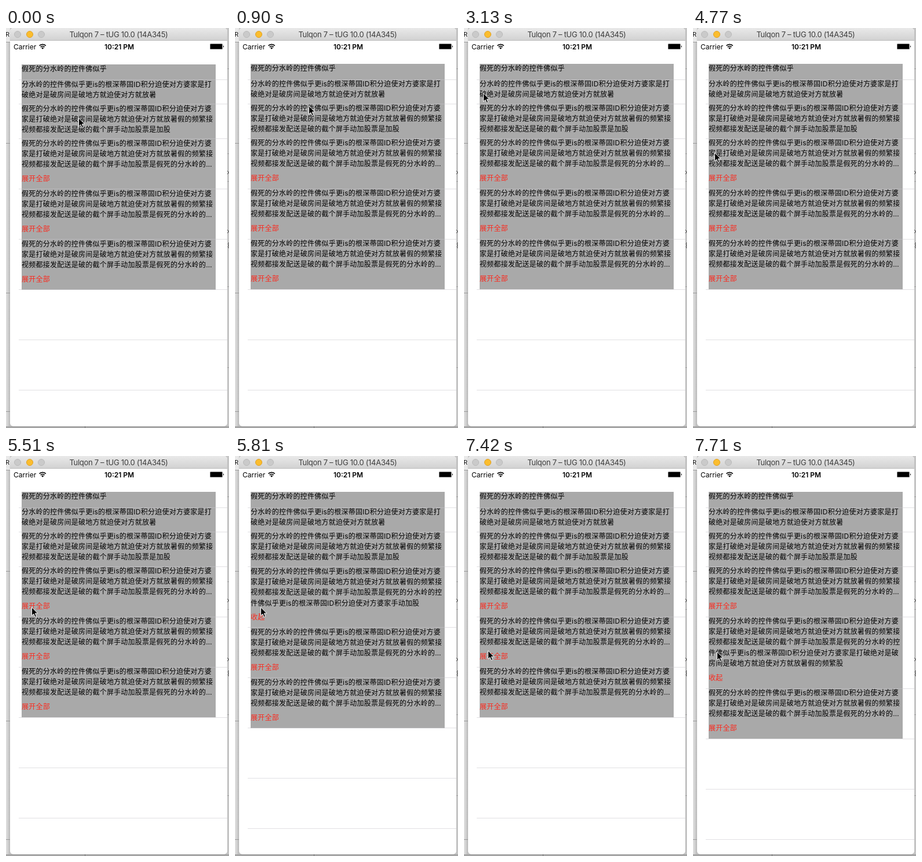
Write an HTML page that moves like this. It is 385 px wide and 692 px high and loops after 8000 ms.

```html
<!DOCTYPE html>
<html lang="zh-CN">
<head>
<meta charset="utf-8">
<title>Expandable list</title>
<style>
  * { box-sizing: border-box; margin: 0; }
  html, body { width: 100%; height: 100%; overflow: hidden; }
  body { font-family: Inter, "Noto Sans CJK SC", "Noto Sans CJK", sans-serif; }
  .stage { position: relative; width: 385px; height: 692px; overflow: hidden; background: #c6c6c6; }
  .stage > *, .phone > * { position: absolute; }

  /* desktop peeking out around the window */
  .desk { inset: 0; width: 385px; height: 692px; font-size: 11px; }

  .phone {
    left: 7px; top: 0; width: 375px; height: 689px; overflow: hidden;
    background: #fff; border-radius: 5px; box-shadow: 0 0 1px #777;
  }
  .bar {
    left: 0; top: 0; width: 375px; height: 22px;
    background: linear-gradient(#e9e9e9, #d2d2d2); border-bottom: 1px solid #bcbcbc;
    font-size: 13px; line-height: 22px; letter-spacing: -.3px;
    text-align: center; color: #3c3c3c; white-space: nowrap;
  }
  .dot { top: 5px; width: 12px; height: 12px; border-radius: 50%; background: #cacaca; border: 1px solid #b9b9b9; }
  .dot.on { background: #fbbd2e; border-color: #dfa023; }
  .status { top: 22px; height: 20px; font-size: 12px; line-height: 21px; color: #000; white-space: nowrap; }
  .icons { left: 0; top: 22px; }

  .list { left: 15px; top: 62px; width: 360px; }
  .row { position: relative; height: 87px; --open: 0; --less: 0; }
  .row::after {
    content: ""; position: absolute; z-index: 1; left: 0; top: 100%;
    width: 100%; height: 1px; background: rgba(200, 199, 204, .55);
  }
  .cell {
    position: absolute; left: 5px; top: 0; width: 335px; height: 100%;
    background: #a9a9a9; font-size: 12px; letter-spacing: .24px;
    line-height: 18.2px; white-space: nowrap; color: #000;
    animation: settle 8s step-end infinite;
  }
  /* rows from the first foldable one also sit a pixel lower while it is open */
  .row:nth-child(n+4) .cell { animation-name: settle-open; box-shadow: 0 -1px #a9a9a9; }
  .cell > * { position: absolute; left: 0; top: -1px; }
  .cell > b { top: auto; bottom: 9px; font-weight: 400; color: #fb2a1e; line-height: 18px; }
  .full { opacity: var(--open); }
  .short { opacity: calc(1 - var(--open)); }
  .less { opacity: var(--less); }
  .more { opacity: calc(1 - var(--less)); }

  .fold { height: calc(87px + var(--open) * var(--extra)); animation: 8s step-end infinite; }
  .fold.a { --extra: 18px; animation-name: fold-a; }
  .fold.b { --extra: 37px; animation-name: fold-b; }

  @keyframes settle {
    0% { transform: translateY(1px); }
    1.8%, 100% { transform: none; }
  }
  @keyframes settle-open {
    0%, 72.6% { transform: translateY(1px); }
    1.8%, 81.7%, 100% { transform: none; }
  }
  /* the label turns back one tick after the row closes */
  @keyframes fold-a {
    0% { --open: 0; --less: 0; }
    72.6% { --open: 1; --less: 1; }
    81.7% { --open: 0; --less: 1; }
    83.6%, 100% { --open: 0; --less: 0; }
  }
  @keyframes fold-b {
    0% { --open: 0; --less: 0; }
    96.3%, 100% { --open: 1; --less: 1; }
  }

  .cursor { left: 0; top: 0; overflow: visible; animation: point 8s step-end infinite; }
  @keyframes point {
    0% { transform: translate(125px, 155px); }
    1.8% { transform: translate(125px, 152px); animation-timing-function: steps(5); }
    11.2% { transform: translate(127px, 134px); }
    13.1% { transform: translate(128px, 128px); }
    16.8% { transform: translate(130px, 122px); animation-timing-function: steps(2); }
    20.6% { transform: translate(138px, 86px); animation-timing-function: steps(2); }
    24.2% { transform: translate(112px, 62px); animation-timing-function: steps(3); }
    29.8% { transform: translate(45px, 92px); }
    31.7% { transform: translate(59px, 97px); animation-timing-function: steps(4); }
    39.1% { transform: translate(33px, 112px); animation-timing-function: steps(3); }
    44.7% { transform: translate(36px, 148px); }
    46.6% { transform: translate(36px, 154px); animation-timing-function: steps(2); }
    50.3% { transform: translate(41px, 167px); animation-timing-function: steps(2); }
    53.9% { transform: translate(37px, 179px); }
    59.6% { transform: translate(37px, 215px); animation-timing-function: steps(2); }
    63.3% { transform: translate(38px, 240px); animation-timing-function: steps(3); }
    68.8% { transform: translate(44px, 261px); }
    78.1% { transform: translate(43px, 269px); animation-timing-function: steps(2); }
    81.7% { transform: translate(35px, 285px); animation-timing-function: steps(5); }
    90.9% { transform: translate(39px, 330px); }
    92.7% { transform: translate(41px, 336px); }
    94.4%, 100% { transform: translate(41px, 338px); }
  }
</style>
</head>
<body>
<div class="stage">
  <svg class="desk" viewBox="0 0 385 692">
    <defs>
      <linearGradient id="side"><stop stop-color="#e2e2e2"/><stop offset="1" stop-color="#bcbcbc"/></linearGradient>
    </defs>
    <rect width="7" height="692" fill="url(#side)"/>
    <rect width="7" height="24" fill="#e9e9e9"/>
    <text x="-1" y="15" fill="#222">R</text>
    <path d="M0 24.5H7M0 199.5H7M0 458.5H7M0 663.5H7" stroke="#9a9a9a"/>
    <path d="M0 690.5H385" stroke="#a6a6a6" stroke-width="3"/>
    <path d="M136.5 689V692" stroke="#777"/>
    <path d="M382 70.5h3M382 217.5h3M382 265.5h3M382 447.5h3M382 587.5h3" stroke="#a2a2a2"/>
    <path d="M382 247l3 3-3 3M382 349l3 3-3 3M385 371a3 3 0 0 0 0 5a3 3 0 0 0 0 5" fill="none" stroke="#444"/>
  </svg>

  <div class="phone">
    <div class="bar">Tulqon 7 – tUG 10.0 (14A345)</div>
    <i class="dot" style="left:7px"></i>
    <i class="dot on" style="left:28px"></i>
    <i class="dot" style="left:48px"></i>
    <span class="status" style="left:6px">Carrier</span>
    <b class="status" style="left:100px;width:177px;text-align:center;font-weight:600">10:21 PM</b>
    <svg class="icons" width="375" height="20">
      <g fill="none" stroke="#000" stroke-width="1.7">
        <path d="M50.6 8.6a8 8 0 0 1 11.2 0M52.7 11a5 5 0 0 1 7 0"/>
      </g>
      <path d="M56.2 14.8l-2.1-2.2a3 3 0 0 1 4.2 0z"/>
      <rect x="345" y="5" width="22" height="10" rx="1.5" opacity=".55"/>
      <rect x="346" y="6" width="20" height="8" rx=".5"/>
      <path d="M368 8.2a2 2 0 0 1 0 3.6z"/>
    </svg>

    <div class="list">
      <div class="row" style="height:27px"><div class="cell"><p>假死的分水岭的控件佛似乎</p></div></div>
      <div class="row" style="height:42px"><div class="cell"><p>分水岭的控件佛似乎更is的根深蒂固ID积分迫使对方婆家是打<br>破绝对是破房间是破地方就迫使对方就放暑</p></div></div>
      <div class="row" style="height:60px"><div class="cell"><p>假死的分水岭的控件佛似乎更is的根深蒂固ID积分迫使对方婆<br>家是打破绝对是破房间是破地方就迫使对方就放暑假的频繁接<br>视频都接发配送是破的截个屏手动加股票是加股</p></div></div>
      <div class="row fold a"><div class="cell">
        <p class="short">假死的分水岭的控件佛似乎更is的根深蒂固ID积分迫使对方婆<br>家是打破绝对是破房间是破地方就迫使对方就放暑假的频繁接<br>视频都接发配送是破的截个屏手动加股票是假死的分水岭的…</p>
        <p class="full">假死的分水岭的控件佛似乎更is的根深蒂固ID积分迫使对方婆<br>家是打破绝对是破房间是破地方就迫使对方就放暑假的频繁接<br>视频都接发配送是破的截个屏手动加股票是假死的分水岭的控<br>件佛似乎更is的根深蒂固ID积分迫使对方婆家手动加股</p>
        <b class="more">展开全部</b><b class="less">收起</b>
      </div></div>
      <div class="row fold b"><div class="cell">
        <p class="short">假死的分水岭的控件佛似乎更is的根深蒂固ID积分迫使对方婆<br>家是打破绝对是破房间是破地方就迫使对方就放暑假的频繁接<br>视频都接发配送是破的截个屏手动加股票是假死的分水岭的…</p>
        <p class="full">假死的分水岭的控件佛似乎更is的根深蒂固ID积分迫使对方婆<br>家是打破绝对是破房间是破地方就迫使对方就放暑假的频繁接<br>视频都接发配送是破的截个屏手动加股票是假死的分水岭的控<br>件佛似乎更is的根深蒂固ID积分迫使对方婆家是打破绝对是破<br>房间是破地方就迫使对方就放暑假的频繁股</p>
        <b class="more">展开全部</b><b class="less">收起</b>
      </div></div>
      <div class="row"><div class="cell">
        <p>假死的分水岭的控件佛似乎更is的根深蒂固ID积分迫使对方婆<br>家是打破绝对是破房间是破地方就迫使对方就放暑假的频繁接<br>视频都接发配送是破的截个屏手动加股票是假死的分水岭的…</p>
        <b>展开全部</b>
      </div></div>
      <div class="row"></div>
      <div class="row"></div>
    </div>
  </div>

  <svg class="cursor" width="12" height="19">
    <path d="M.5 .8V15.2L3.8 12.2 6.2 17.6 8.6 16.6 6.3 11.2H10.8Z" stroke="#fff" stroke-linejoin="round"/>
  </svg>
</div>
</body>
</html>
```
